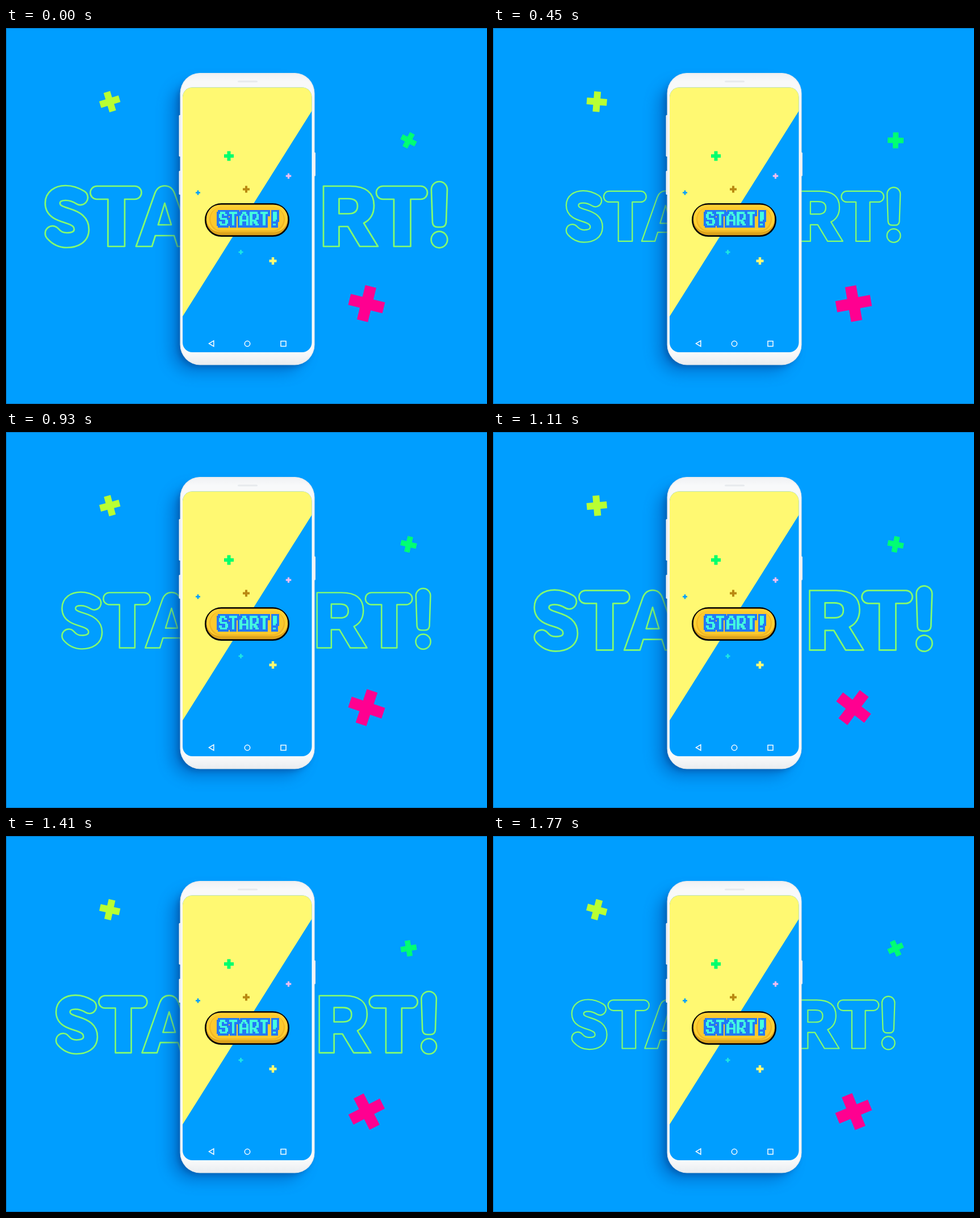
Animation, 847 px wide and 661 px high, one loop 1.8 s. Source, as an HTML page:

```html
<!DOCTYPE html>
<html lang="en">
<head>
<meta charset="utf-8">
<title>Start</title>
<style>
  html, body { margin: 0; width: 100%; height: 100%; overflow: hidden; background: #009eff; }
  svg { display: block; width: 847px; height: 661px; }
</style>
</head>
<body>
<svg viewBox="0 0 847 661" role="img" aria-label="START!">
  <defs>
    <filter id="soft" x="-30%" y="-30%" width="160%" height="160%">
      <feGaussianBlur stdDeviation="13"/>
    </filter>
    <filter id="near" x="-30%" y="-30%" width="160%" height="160%">
      <feGaussianBlur stdDeviation="5"/>
    </filter>
    <linearGradient id="shell" x1="0" y1="0" x2="0" y2="1">
      <stop offset="0" stop-color="#f0f1f3"/>
      <stop offset=".03" stop-color="#f8f9fa"/>
      <stop offset=".96" stop-color="#f8f9fa"/>
      <stop offset="1" stop-color="#e9ecef"/>
    </linearGradient>
    <clipPath id="screen"><rect x="311" y="104.500" width="227.500" height="465.500" rx="17"/></clipPath>
  </defs>

  <rect width="847" height="661" fill="#009eff"/>
  <path d="M0 .5H847M.5 0V661M0 660.500H847" stroke="#0873bd" fill="none"/>

  <g id="word" fill="none" stroke="#86ff6c" stroke-width="2.700" stroke-linejoin="round">
    <g stroke-linecap="round">
      <path id="s" stroke-width="27.500" d="M131 298C123 293 115 290 105 290C91 290 82 297 82 308C82 322 95 326 108 330C124 335 133 341 133 354C133 367 122 373 107 373C96 373 89 369 82 361"/>
      <use href="#s" id="sInner"/>
    </g>
    <path id="t" d="M160 278H227A11.500 11.500 0 0 1 227 301H209V384H179.500V301H160A11.500 11.500 0 0 1 160 278Z"/>
    <use href="#t" x="503.500"/>
    <path d="M229 384L262 291Q267 277.500 279.500 277.500Q292 277.500 297 291L330 384H302L296 365H263L257 384ZM279.500 308L268 346H291Z"/>
    <path d="M559 384V278H606C634 278 648 290 648 312C648 327 642 337 630 343L655 384H623L602 349H586.500V384ZM586.500 300V326.500H603Q619 326.500 619 313Q619 300 603 300Z"/>
    <path d="M749 284A14 14 0 0 1 777 284L775 342Q774 350 766 350H760Q752 350 751 342Z"/>
    <circle cx="763" cy="372" r="14.300"/>
  </g>

  <rect x="290" y="98" width="236" height="508" rx="38" fill="#00459c" opacity=".42" filter="url(#soft)"/>
  <rect x="302" y="90" width="236" height="506" rx="36" fill="#00357c" opacity=".38" filter="url(#near)"/>

  <g fill="#eceff2">
    <rect x="304.500" y="153" width="5" height="73" rx="1.500"/>
    <rect x="304.500" y="251" width="5" height="42" rx="1.500"/>
    <rect x="540" y="218.500" width="5" height="42" rx="1.500"/>
  </g>
  <rect x="306.500" y="79" width="237" height="513.500" rx="35" ry="36" fill="url(#shell)"/>
  <rect x="307.500" y="80" width="235" height="511.500" rx="34" ry="35" fill="none" stroke="#e4e8ec"/>
  <rect x="408" y="92.500" width="35" height="3" rx="1.500" fill="#e7eaed"/>

  <g clip-path="url(#screen)">
    <rect x="311" y="104" width="228" height="467" fill="#009eff"/>
    <path d="M311 104H539V145L311 507Z" fill="#fff972"/>
  </g>
  <g fill="none" stroke="#fff" stroke-width="1.500">
    <path d="M357.500 554.700L365.800 549.800V559.600Z"/>
    <circle cx="425" cy="555" r="4.700"/>
    <rect x="484" y="550.500" width="9" height="9"/>
  </g>
  <g id="specks"></g>

  <rect x="351.300" y="309.300" width="146.400" height="56.400" rx="28.200" fill="#dda31c" stroke="#050505" stroke-width="2.700"/>
  <rect x="353" y="310.700" width="143" height="48" rx="24" fill="#ffd033"/>
  <rect x="358" y="315" width="133" height="43.500" rx="21.700" fill="#f0b624"/>
  <rect x="360" y="315" width="129" height="41" rx="20.500" fill="#fcc92d"/>
  <g id="label" shape-rendering="crispEdges"></g>
  <g id="spinners"></g>
</svg>
<script>
const LOOP = 1800, STEP = 30;
const byId = id => document.getElementById(id);

function add(parent, tag, attrs) {
  const el = document.createElementNS("http://www.w3.org/2000/svg", tag);
  for (const k in attrs) el.setAttribute(k, attrs[k]);
  return parent.appendChild(el);
}

function plus(parent, x, y, size, arm, fill) {
  const g = add(parent, "g", { transform: `translate(${x} ${y})` });
  const a = arm / 2, h = size / 2;
  return add(g, "path", { fill, d: `M${-a} ${-h}H${a}V${-a}H${h}V${a}H${a}V${h}H${-a}V${a}H${-h}V${-a}H${-a}Z` });
}

// The S is a thick line with a thinner one on top, leaving only its contour.
byId("s").removeAttribute("stroke-width");
byId("s").parentNode.setAttribute("stroke-width", 28.700);
byId("sInner").setAttribute("stroke", "#009eff");
byId("sInner").setAttribute("stroke-width", 23.300);

[
  [392.500, 225, 17, 6, "#00ff6c"],
  [338, 289.500, 8, 2.600, "#009eff"],
  [423, 283.500, 12, 4, "#b98912"],
  [497.500, 260.200, 9.500, 3.200, "#f3bdf0"],
  [413.500, 394, 8, 2.600, "#1ee9e2"],
  [470, 409.500, 13, 4.400, "#fff972"]
].forEach(p => plus(byId("specks"), ...p));

// Pixel lettering: each glyph is seven rows of seven cells.
const glyphs = {
  S: ".1111..,11..11.,11.....,.11111.,.....11,11...11,.11111.",
  T: "111111.,..11...,..11...,..11...,..11...,..11...,..11...",
  A: "..111..,.11.11.,11...11,11...11,1111111,11...11,11...11",
  R: "111111.,11...11,11...11,11..111,11111..,11.111.,11..111",
  "!": "..111..,..111..,..111..,..111..,..11...,.......,..11..."
};

function letters(fill, grow) {
  const w = 2.270, h = 3.430;
  [..."START!"].forEach((ch, i) => {
    glyphs[ch].split(",").forEach((row, r) => {
      for (const run of row.matchAll(/1+/g)) {
        add(byId("label"), "rect", {
          x: 375 + (i * 8 + run.index) * w - grow,
          y: 323.300 + r * h - grow,
          width: run[0].length * w + 2 * grow,
          height: h + 2 * grow,
          fill
        });
      }
    });
  });
}
letters("#2279f6", 3.800);
letters("#43ffe0", 0);

const wave = (t, period, peak) => Math.cos(2 * Math.PI * (t - peak) / period);

// Smooth curve through unevenly spaced keys.
const times = [0, 240, 690, 930, 1290, 1530, 1770];
function curve(v, t) {
  const n = times.length;
  const slope = i => {
    const a = Math.max(i - 1, 0), b = Math.min(i + 1, n - 1);
    return (v[b] - v[a]) / (times[b] - times[a]);
  };
  let i = 0;
  while (i < n - 2 && t > times[i + 1]) i++;
  const d = times[i + 1] - times[i], u = (t - times[i]) / d;
  const u2 = u * u, u3 = u2 * u;
  return v[i] * (2 * u3 - 3 * u2 + 1) + v[i + 1] * (3 * u2 - 2 * u3)
    + d * (slope(i) * (u3 - 2 * u2 + u) + slope(i + 1) * (u3 - u2));
}

const spinners = [
  { el: plus(byId("spinners"), 635, 484.500, 62, 19.800, "#ff0090"),
    turn: t => 30 + 40 * wave(t, 2400, 1640) },
  { el: plus(byId("spinners"), 182.800, 129.500, 35.500, 12, "#b8ff33"),
    turn: t => curve([-17, 3, 0, -15, 8, 15, 15], t) },
  { el: plus(byId("spinners"), 709, 197.500, 28, 9.600, "#00ff73"),
    turn: t => curve([28, 10, -3, 13, 3, -22, -25], t) }
];

const begin = performance.now();
function draw() {
  const now = Math.max(0, performance.now() - begin);
  const t = Math.floor(now % LOOP / STEP) * STEP;
  const scale = 0.901 + 0.099 * wave(t, 1200, 0);
  byId("word").setAttribute("transform", `translate(423.500 330.500) scale(${scale}) translate(-423.500 -330.500)`);
  for (const s of spinners) s.el.setAttribute("transform", `rotate(${s.turn(t)})`);
  requestAnimationFrame(draw);
}
draw();
</script>
</body>
</html>
```
